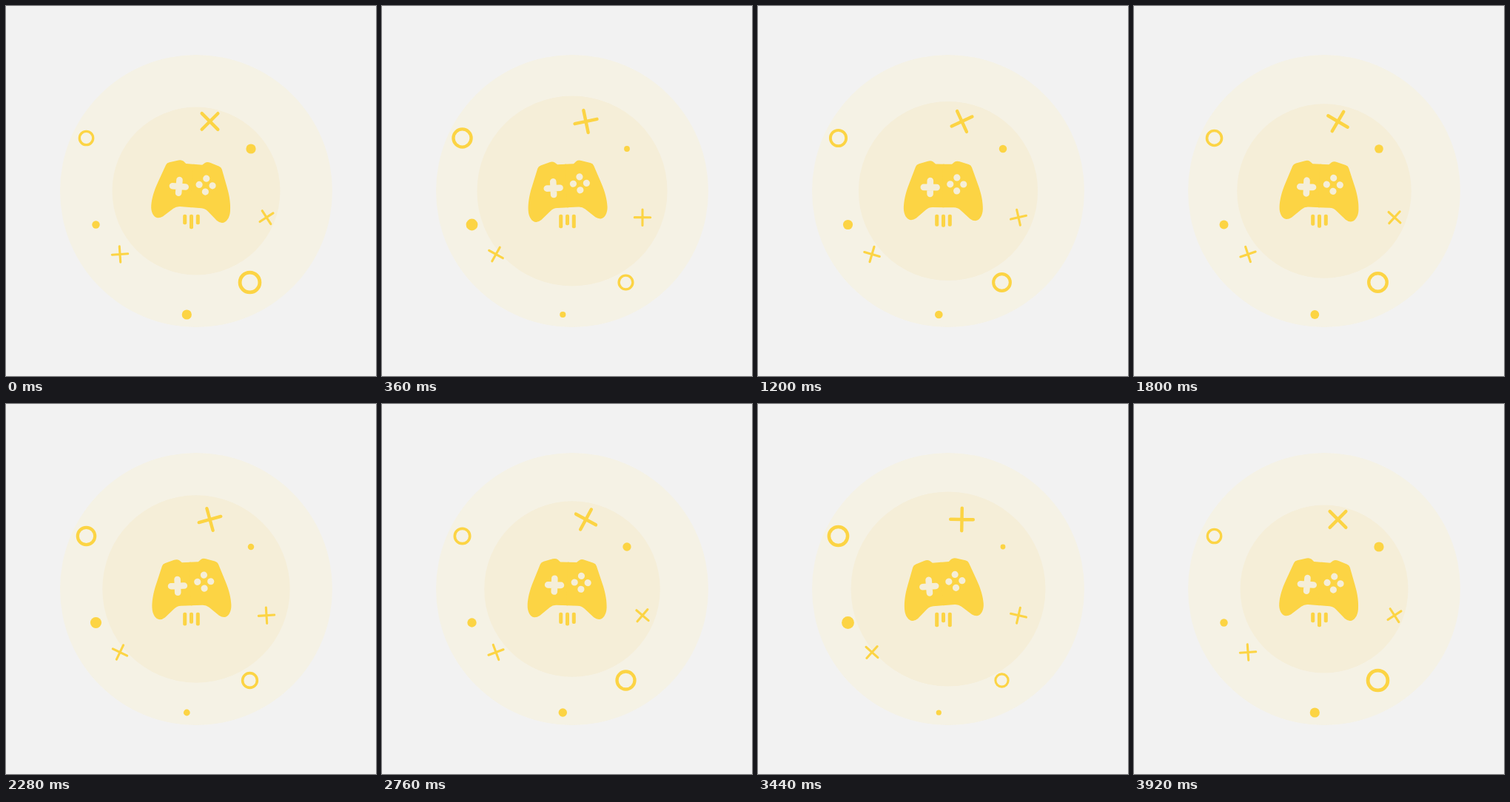
Write an HTML page that moves like this. It is 500 px wide and 500 px high and loops after 3.96 s.

```html
<!DOCTYPE html>
<html lang="en">
<head>
<meta charset="utf-8">
<title>Game controller</title>
<style>
  html, body { margin: 0; height: 100%; overflow: hidden; background: #f2f2f2; }
  svg { display: block; width: 500px; height: 500px; }
  .solid { fill: #fcd444; }
  .line { fill: none; stroke: #fcd444; stroke-linecap: round; }
  .glow { fill: #f5eed8; }
  .cut { fill: none; stroke: #f5eed8; stroke-linecap: round; }
</style>
</head>
<body>
<svg id="stage" viewBox="0 0 500 500">
  <circle cx="257" cy="250" r="184" fill="#f5f2e5"/>
  <circle id="halo" class="glow" cx="257" cy="250"/>
  <g id="pad">
    <path id="half" class="solid" d="M1-36H-11L-14.500-39Q-17.500-41-21.500-39.700L-33.500-36Q-37-35-38-32L-46.500-9
      C-51.500 4-53.500 15-53.500 24S-49 40-43.500 40Q-40 40-36.500 37.500L-23.500 26Q-19.500 22.500-14.500 22.500H1Z"/>
    <use href="#half" transform="scale(-1 1)"/>
  </g>
</svg>
<script>
const LOOP = 3960, HOLD = 40, CYCLES = 4;
const stage = document.getElementById('stage');
const halo = document.getElementById('halo');
const pad = document.getElementById('pad');
const updates = [];

function set(el, attrs) {
  for (const key in attrs) el.setAttribute(key, attrs[key]);
}

function add(parent, tag, attrs) {
  const el = document.createElementNS('http://www.w3.org/2000/svg', tag);
  set(el, attrs);
  parent.append(el);
  return el;
}

const plus = half => `M${-half} 0H${half}M0 ${-half}V${half}`;

// Turns a quarter per cycle
function cross(x, y, half, angle) {
  const el = add(stage, 'path', { class: 'line', d: plus(half), 'stroke-width': half * 0.29 });
  updates.push((wave, phase) =>
    set(el, { transform: `translate(${x} ${y}) rotate(${angle + 90 * phase})` }));
}

// Radius breathes around its mean; a negative swing runs in antiphase
function pulse(type, cx, cy, mean, swing) {
  const el = add(stage, 'circle', { class: type, cx, cy });
  updates.push(wave => {
    const r = mean + swing * wave;
    set(el, { r, 'stroke-width': r * 0.36 });
  });
}

add(pad, 'path', { class: 'cut', d: plus(8.9), 'stroke-width': 8.6, transform: 'translate(-18 -4.500)' });
for (let i = 0; i < 4; i++) {
  const angle = i * Math.PI / 2;
  add(pad, 'circle', { class: 'glow', cx: 18 + 9 * Math.cos(angle), cy: -9 + 9 * Math.sin(angle), r: 4.6 });
}

cross(275.5, 156, 15.3, 45);
cross(352, 285.7, 10.7, -33);
cross(154, 335.5, 10.7, -4);
pulse('line', 108.5, 178.5, 10.9, -1.7);
pulse('line', 329.5, 373.5, 11, 2.4);
pulse('solid', 121.5, 295.5, 6.8, -1.6);
pulse('solid', 331, 193, 5, 1.6);
pulse('solid', 244.3, 417, 5.1, 1.5);

// Sound bars: the middle one grows while its neighbours shrink
for (let i = -1; i <= 1; i++) {
  const bar = add(stage, 'rect', { class: 'solid', x: 248 + 8.8 * i, y: 281.7, width: 5, rx: 2 });
  updates.push(wave => set(bar, { height: 16.5 + (i ? -3 : 3) * wave }));
}

updates.push(wave => {
  set(halo, { r: 122.5 - 9 * wave });
  set(pad, { transform: `translate(250.500 249.700) rotate(${4.4 * wave} 0 12)` });
});

const start = performance.now();
function tick() {
  const time = (performance.now() - start) % LOOP;
  const phase = Math.min(1, time / (LOOP - HOLD)) * CYCLES;
  const wave = Math.cos(phase * 2 * Math.PI);
  for (const update of updates) update(wave, phase);
  requestAnimationFrame(tick);
}
tick();
</script>
</body>
</html>
```
